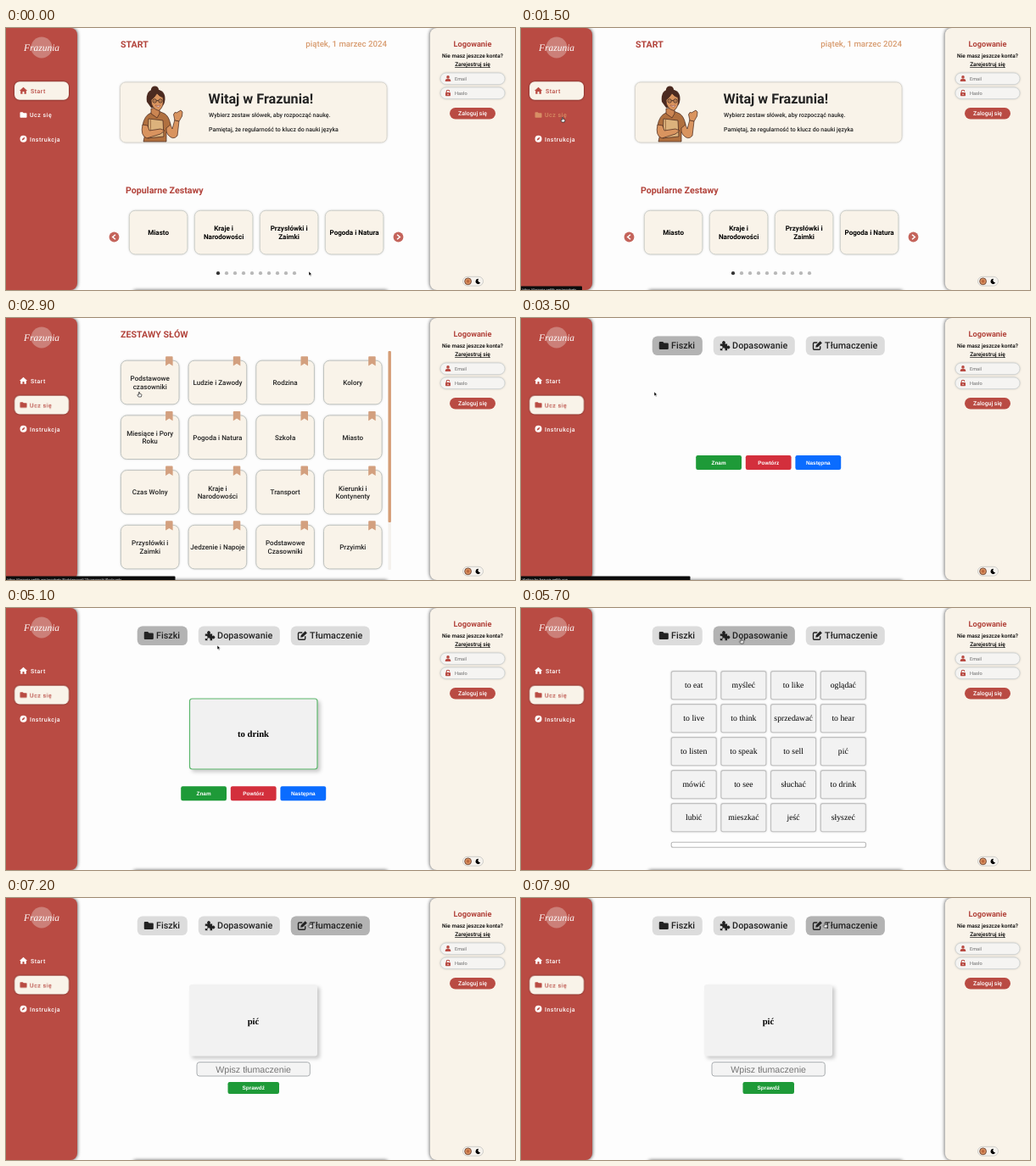
Recreate the animation shown at these times as an HTML page. Size 600 by 309 pixels, loop 8000 ms.

```html
<!DOCTYPE html>
<html lang="pl">
<head>
<meta charset="utf-8">
<title>Frazunia</title>
<style>
html, body { margin: 0; width: 100%; height: 100%; overflow: hidden; background: #fdfdfd; }
svg { display: block; font-family: Roboto, sans-serif; font-weight: 500; text-rendering: geometricPrecision; }
text { text-anchor: middle; white-space: pre; }
.l { text-anchor: start; }
.r { text-anchor: end; }
.b { font-weight: 700; }
.n { font-weight: 400; }
.arial { font-family: "Liberation Sans", Arial, sans-serif; }
.times { font-family: "Liberation Serif", Times, serif; }
.nav { letter-spacing: .5px; }
.panel { filter: drop-shadow(0 0 2px rgba(0,0,0,.75)); }
.soft { filter: drop-shadow(0 0 1px rgba(0,0,0,.16)); }
.lift { filter: drop-shadow(0 .5px 1.2px rgba(0,0,0,.5)); }
.deep { filter: drop-shadow(3px 3px 2px rgba(0,0,0,.2)); }
.pop { transform-origin: 42px 102.5px; animation: pop 8s linear infinite; }
.cursor { animation: move 8s linear infinite; }
@keyframes pop {
  0%, 22.5% { transform: scale(1.03); }
  23.75%, 30% { transform: scale(1.08); }
  32.5%, 100% { transform: none; }
}
@keyframes move {
  0%, 1.25% { transform: translate(357px, 287px); animation-timing-function: ease-in-out; }
  11.25% { transform: translate(58px, 114px); }
  15%, 29% { transform: translate(49px, 105px); animation-timing-function: ease-in-out; }
  36.25%, 51.25% { transform: translate(157px, 87px); animation-timing-function: ease-in-out; }
  55%, 57.5% { transform: translate(283px, 150px); animation-timing-function: ease-in-out; }
  63.75% { transform: translate(249px, 44px); }
  66.25%, 70% { transform: translate(257px, 36px); animation-timing-function: ease-in-out; }
  80% { transform: translate(340px, 30px); }
  86.25%, 100% { transform: translate(358.5px, 29px); }
}
</style>
</head>
<body>
<svg id="stage" xmlns="http://www.w3.org/2000/svg" width="600" height="309"></svg>
<script>
const RED = '#b94b43', HEAD = '#b2433b', CREAM = '#f9f3e9', INK = '#222', GREEN = '#1e9a38';

const rect = (x, y, w, h, r, fill, more = '') =>
  `<rect x="${x}" y="${y}" width="${w}" height="${h}" rx="${r}" fill="${fill}" ${more}/>`;
const dot = (x, y, r, fill, more = '') => `<circle cx="${x}" cy="${y}" r="${r}" fill="${fill}" ${more}/>`;
const path = (d, fill, more = '') => `<path d="${d}" fill="${fill}" ${more}/>`;
const text = (x, y, size, fill, s, cls = '', more = '') =>
  `<text x="${x}" y="${y}" font-size="${size}" fill="${fill}" class="${cls}" ${more}>${s}</text>`;
const group = (cls, ...kids) => `<g class="${cls}">${kids.join('')}</g>`;
const at = (x, y, s, k = 1) => `<g transform="translate(${x} ${y}) scale(${k})">${s}</g>`;
const line = (c, w = 1) => `stroke="${c}" stroke-width="${w}"`;

// Parts that exist only from one time to another, in ms
let css = '', count = 0;
const during = (spans, ...kids) => {
  const name = 'show' + count++;
  const keys = spans.map(([a, b]) => `${a / 80}%{opacity:1}${b / 80}%{opacity:0}`).join('');
  css += `@keyframes ${name}{0%,100%{opacity:${spans[0][0] ? 0 : 1}}${keys}}` +
    `.${name}{animation:${name} 8s step-end infinite}`;
  return group(name, ...kids);
};

const icon = {
  home: c => path('M-4.6 0L0-4.2 4.6 0H3.3V3.8H1V1H-1V3.8H-3.3V0Z', c),
  folder: c => path('M-4-2.5q0-.8.8-.8h2.4l1 1h3q.8 0 .8.8v3.9q0 .8-.8.8h-6.4q-.8 0-.8-.8Z', c),
  compass: c => path('M0-4a4 4 0 100 8a4 4 0 100-8M2-2L.8.8-2 2-.8-.8Z', c, 'fill-rule="evenodd"'),
  puzzle: c => path('M-5.5-2.2H-2.6a1.9 1.9 0 1 1 2.6 0H2.8V.6a1.9 1.9 0 1 1 0 2.6V5.6H0a1.7 1.7 0 1 0-2.6 0H-5.5V3.2a1.7 1.7 0 1 0 0-2.6Z', c),
  edit: c => path('M0-3.6H-3.6q-1.2 0-1.2 1.2V3.4q0 1.2 1.2 1.2H2.2q1.2 0 1.2-1.2V.6', 'none', line(c, 1.4)) +
    path('M-2.1 2.1L-1.5-.5 3.4-5.4 5.6-3.2.6 1.7Z', c),
  user: c => dot(0, -1.7, 1.8, c) + path('M-3.3 3.3q0-2.9 2-2.9h2.6q2 0 2 2.9Z', c),
  lock: c => rect(-3, -.5, 6, 4.2, .8, c) + path('M-1.8 0V-1.6a1.8 1.8 0 013.6 0', 'none', line(c, 1.1)) +
    dot(0, 1.6, .7, '#f3f3f3'),
  bookmark: c => path('M0 .9Q0 0 .9 0H7.6Q8.5 0 8.5.9V11.3L4.25 8.6 0 11.3Z', c)
};

function navItem(name, x, y, label, color) {
  return at(20.5, y, icon[name](color)) + text(x, y + 2.8, 7, color, label, 'l nav');
}
const navBox = y => group('lift', rect(10, y - 10.8, 64, 21.6, 6, CREAM));

function sidebar() {
  const start = c => navItem('home', 29, 74, 'Start', c);
  const learn = c => navItem('folder', 28, 102.5, 'Ucz się', c);
  return group('panel', rect(-12, 0, 96, 309, 8, RED)) +
    dot(42, 23, 12.5, '#cc8079') + text(42, 26.5, 11.5, '#fff', 'Frazunia', 'times', 'font-style="italic"') +
    during([[0, 1800]], navBox(74), start(RED)) +
    during([[1800, 8000]], start('#fff'), group('pop', navBox(102.5), learn(RED))) +
    during([[0, 900]], learn('#fff')) +
    during([[900, 1800]], learn('#d78f65')) +
    navItem('compass', 28, 130.7, 'Instrukcja', '#fff');
}

function login() {
  const field = (y, name, label) => group('soft', rect(512, y, 76, 13.6, 6.8, '#f5f4f2', line('#cfd3d3', .9))) +
    at(521, y + 6.6, icon[name](RED)) + text(529, y + 8.8, 5.6, '#6c6c6c', label, 'l n');
  return group('panel', rect(499.8, 0, 112, 309, 8, CREAM)) +
    text(550, 21.5, 9.2, HEAD, 'Logowanie', 'b') +
    text(550, 34.6, 6.5, '#000', 'Nie masz jeszcze konta?') +
    text(550, 45, 6.55, '#000', 'Zarejestruj się', '', 'text-decoration="underline"') +
    field(53, 'user', 'Email') + field(70, 'lock', 'Hasło') +
    rect(523, 94, 54, 13.5, 6.7, RED) + text(550, 103.1, 6.9, '#fff', 'Zaloguj się') +
    rect(538.5, 293.3, 24, 10.8, 5.4, '#f6f3ee', line('#c9c9c6', .9)) +
    dot(544.6, 298.8, 3.9, '#d98f5f', line('#6b4636', .9)) + dot(544.6, 298.8, 1.7, '#b9663c') +
    path('M557 295.9a3 3 0 102.2 4.4a2.7 2.7 0 01-2.2-4.4Z', '#000');
}

// Card label on one or two lines
const label = (x, y, s, cls) => s.split('|').map((part, i, all) =>
  text(x, y + 2.8 + (i - (all.length - 1) / 2) * 9.4, 8.05, cls ? '#000' : INK, part, cls)).join('');
const card = (x, y, s, edge, cls) =>
  group('soft', rect(x, y, 68.6, 51.6, 7, CREAM, line(edge))) + label(x + 34.3, y + 25.8, s, cls);

function teacher() {
  const o = line('#43251c', .7), skin = '#d9945f', shirt = '#b0703f';
  return path('M187 103L193 112 196 119 199 108 204 110 202 127Q197 133 191 126L186 117Z', skin, o) +
    path('M199 109L197.5 102Q199 98 201 100L206 97 208 99 207.5 104 204 110Z', skin, o) +
    path('M162 134L165 120 161 115Q163 103 171 100L180 98 187 101Q192 104 194 114L189 118 189 134Z', shirt, o) +
    path('M171 95V101L178 106 181 101V94Z', '#cb8552', o) +
    dot(175.5, 73, 4.6, '#4b2a20') +
    path('M166 87Q164 73 176 72Q188 73 187.5 84Q187 92 182 93L171 94Z', '#4b2a20') +
    path('M171 85Q175 82 178 77Q181 81 185 82Q187 93 180 97.5Q171 95 171 85Z', skin, o) +
    dot(175.2, 86, 2.2, 'none', line('#33201a', .8)) + dot(182, 86, 2.2, 'none', line('#33201a', .8)) +
    path('M177.4 85.6H179.8', 'none', line('#33201a', .8)) +
    dot(175.4, 86, .6, '#2c1814') + dot(182, 86, .6, '#2c1814') +
    path('M176 91Q179 92.3 182 91Q180 95 176 91Z', '#fff', line('#8c3b30', .5)) +
    path('M168 107L185 109 186 128 167 130Z', '#dcb27c', o) + path('M170.5 108V129', 'none', line('#8a5a34', .7)) +
    path('M161 114Q158 127 166 130L182 125 187 121 182 119 169 121 167 115Z', skin, o);
}

function home() {
  const arrow = (x, d) => dot(x, 246.5, 5.9, '#c4645b') +
    path(`M${x - d} 243.7L${x + d * 1.2} 246.5 ${x - d} 249.3`, 'none', line('#fff', 1.5));
  return text(135, 23, 10.67, HEAD, 'START', 'l b') +
    text(449, 22.3, 9.7, '#d89c70', 'piątek, 1 marzec 2024', 'r') +
    group('soft', rect(134.5, 64, 314.5, 71, 6.5, CREAM, line('#d9d6ce'))) + teacher() +
    text(238.5, 88.6, 16.2, INK, 'Witaj w Frazunia!', 'l b') +
    text(239, 105.2, 6.97, INK, 'Wybierz zestaw słówek, aby rozpocząć naukę.', 'l') +
    text(239, 122, 6.97, INK, 'Pamiętaj, że regularność to klucz do nauki języka', 'l') +
    text(141, 194.6, 10.67, HEAD, 'Popularne Zestawy', 'l b') +
    ['Miasto', 'Kraje i|Narodowości', 'Przysłówki i|Zaimki', 'Pogoda i Natura']
      .map((s, i) => card(145.3 + i * 77, 215.3, s, '#cdcfc9', 'b')).join('') +
    arrow(127.5, -1.5) + arrow(462.5, 1.5) +
    Array.from({ length: 10 }, (_, i) => dot(250 + i * 10, 289.2, 2.1, i ? '#b8b8b8' : '#333')).join('');
}

function sets() {
  const names = ['Podstawowe|czasowniki', 'Ludzie i Zawody', 'Rodzina', 'Kolory',
    'Miesiące i Pory|Roku', 'Pogoda i Natura', 'Szkoła', 'Miasto',
    'Czas Wolny', 'Kraje i|Narodowości', 'Transport', 'Kierunki i|Kontynenty',
    'Przysłówki i|Zaimki', 'Jedzenie i Napoje', 'Podstawowe|Czasowniki', 'Przyimki'];
  return text(135, 23, 10.67, HEAD, 'ZESTAWY SŁÓW', 'l b') +
    rect(450.5, 39, 3.4, 258, 1, '#f4f1ed') + rect(450.5, 39, 3.4, 202, 1, '#d59d76') +
    names.map((s, i) => {
      const x = 135.4 + i % 4 * 79.7, y = 50.2 + (i >> 2) * 64.7;
      return card(x, y, s, '#bfc3bf') + at(x + 52.7, y - 5, icon.bookmark('#d3a07f'));
    }).join('');
}

function tabs() {
  const tab = (x, w, name, k, s, from, to) => rect(x, 21.5, w, 22.5, 6, '#dcdcdc') +
    during([[from, to]], rect(x, 21.5, w, 22.5, 6, '#b3b3b3')) +
    at(x + 13.5, 32.6, icon[name](INK), k) + text(x + 22.3, 36.4, 10.77, INK, s, 'l');
  return tab(154.8, 59, 'folder', 1.38, 'Fiszki', 3200, 5500) +
    tab(226.8, 96, 'puzzle', 1, 'Dopasowanie', 5500, 6700) +
    tab(335.8, 93, 'edit', 1, 'Tłumaczenie', 6700, 8000);
}

const button = (x, y, w, h, fill, s) => rect(x, y, w, h, 2.2, fill) +
  text(x + w / 2, y + h / 2 + 2.2, 6.4, '#fff', s, 'b arial');
const answers = y => button(206.2, y, 53.8, 17, GREEN, 'Znam') +
  button(264.8, y, 53.8, 17, '#d32f3c', 'Powtórz') + button(323.4, y, 53.8, 17, '#0a6cff', 'Następna');

const flashcard = () => group('deep', rect(216.5, 107, 150.5, 83, 3, '#f1f1f1', line('#5db76d', 1.2))) +
  text(291.5, 152, 10.65, '#000', 'to drink', 'b times') + answers(210.3);

function match() {
  const words = ['to eat', 'myśleć', 'to like', 'oglądać', 'to live', 'to think', 'sprzedawać', 'to hear',
    'to listen', 'to speak', 'to sell', 'pić', 'mówić', 'to see', 'słuchać', 'to drink',
    'lubić', 'mieszkać', 'jeść', 'słyszeć'];
  return words.map((s, i) => {
    const x = 177.2 + i % 4 * 58.7, y = 74.6 + (i >> 2) * 39;
    return group('soft', rect(x, y, 53, 33.2, 2.2, '#f2f2f2', line('#bfbfbf', 1.1))) +
      text(x + 26.5, y + 19.8, 9.75, '#000', s, 'n times');
  }).join('') + rect(177.2, 276.3, 229.3, 6, 2, '#fff', line('#b8b8b8', 1.1));
}

const translate = () => group('deep', rect(216, 102, 151, 84.5, 3, '#f2f2f2')) +
  text(291.5, 148.5, 10.65, '#000', 'pić', 'b times') +
  rect(225, 193.7, 133.3, 16.3, 3, '#f4f4f4', line('#a9adb0', 1)) +
  text(291.6, 205.6, 10.67, '#757575', 'Wpisz tłumaczenie', 'n arial') +
  button(261.5, 217, 60.5, 14, GREEN, 'Sprawdź');

const status = (w, s) => rect(-2, 304.6, w + 2, 6, 1, '#0c0c0c') + text(1.5, 309.6, 3.95, '#eee', s, 'l n');

function pointer() {
  const arrow = path('M0 0V5L1.2 3.9 2 5.7 2.9 5.3 2.1 3.6H3.6Z', '#000', line('#fff', .5));
  const hand = path('M-.6.6Q0-.2.6.6V2.4L2.6 2.9Q3 3.1 2.8 4.2L2.3 6H-.8L-2.2 3.7Q-1.7 2.9-.6 3.7Z',
    '#fff', line('#222', .7));
  return group('cursor',
    during([[0, 850], [2480, 2750], [3250, 4300], [4720, 5150], [5800, 6250]], arrow),
    during([[850, 2480], [2750, 3250], [4300, 4720], [5150, 5800], [6250, 8000]], hand));
}

const site = 'frazunia.netlify.app';
const parts = [
  during([[0, 1800]], home()),
  during([[1800, 3200]], sets()),
  during([[3200, 8000]], tabs()),
  during([[3200, 3800]], answers(162)),
  during([[3800, 5500]], flashcard()),
  during([[5500, 6700]], match()),
  during([[6700, 8000]], translate()),
  group('panel', rect(150, 309.6, 300, 8, 3, '#ccc')),
  sidebar(), login(),
  during([[900, 2850]], status(72, `https://${site}/wordsets`)),
  during([[2850, 3300]], status(199.5, `https://${site}/wordsets/Podstawowe%20czasowniki/flashcards`)),
  during([[3300, 3900]], status(199.5, `Waiting for ${site}...`)),
  pointer()
];
document.getElementById('stage').innerHTML = `<style>${css}</style>` + parts.join('');
</script>
</body>
</html>
```
